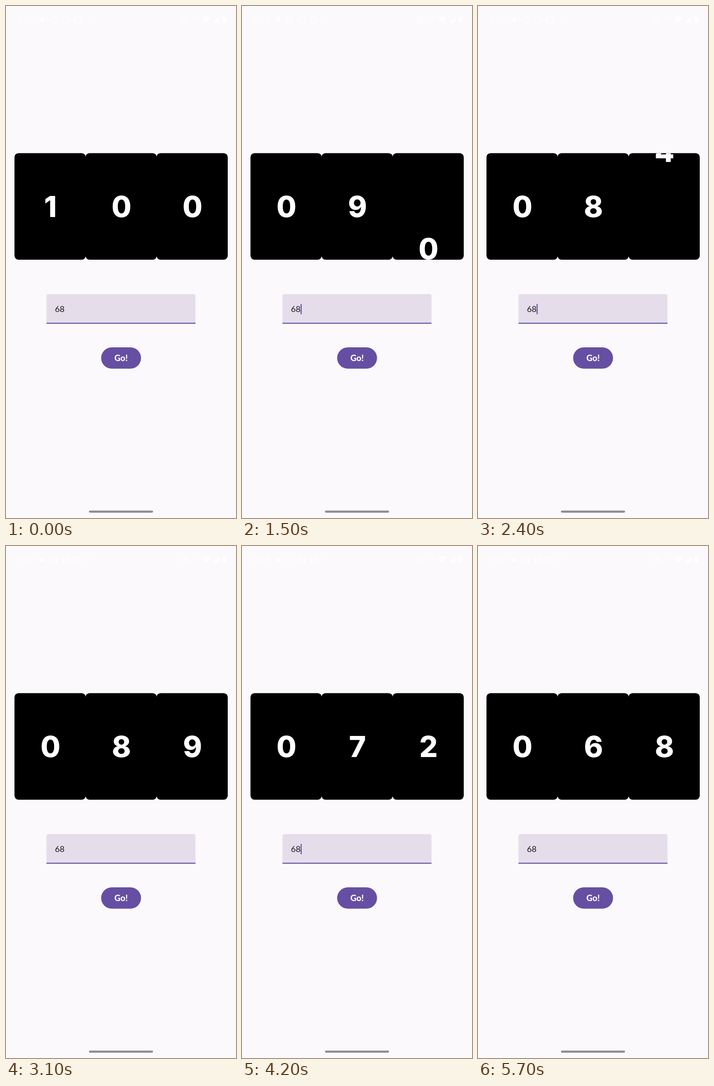
Recreate the animation shown at these times as an HTML page. Size 502 by 1116 pixels, loop 6.2 s.

```html
<!DOCTYPE html>
<html lang="en">
<head>
<meta charset="utf-8">
<title>Countdown</title>
<style>
  html, body { margin: 0; width: 100%; height: 100%; overflow: hidden; background: #fbf9fb; }
  svg { display: block; width: 502px; height: 1116px; }
  text { font-family: Lato, "Open Sans", sans-serif; }
  .digit { font: 800 63px Inter, "Open Sans", sans-serif; fill: #fff; text-anchor: middle; }
  .value { font-size: 18.2px; fill: #1c1b1f; }
  .label { font-size: 18.5px; font-weight: 800; fill: #fff; text-anchor: middle; }
  .clock { font-size: 18px; fill: #fff; }
  .accent { fill: #664fa3; }
  .line { fill: none; stroke: #fff; stroke-width: 1.5; }
</style>
</head>
<body>
<svg viewBox="0 0 502 1116">
  <rect width="502" height="1116" fill="#fbf9fb"/>

  <g fill="#fff">
    <text class="clock" x="24" y="36">9:07</text>
    <rect x="75" y="25" width="8" height="8"/>
    <circle class="line" cx="104" cy="30" r="6.500"/>
    <rect class="line" x="125" y="24" width="12" height="12"/>
    <rect class="line" x="150" y="24" width="12" height="12"/>
    <circle cx="181" cy="29" r="2"/>
    <circle class="line" cx="389.500" cy="29.500" r="6"/>
    <path class="line" d="M389.500 26v4l3 2M410 26q6-5 11 0"/>
    <path d="M428 26q9-7 18 0l-9 11z"/>
    <path d="M466 22v14h-14z"/>
    <rect x="472" y="23" width="9" height="13" rx="2"/>
  </g>

  <g id="reels"></g>

  <path d="M88.300 692V632.600q0-4.600 4.600-4.600H409q4.600 0 4.600 4.600V692z" fill="#e5deea"/>
  <rect class="accent" x="88.300" y="690.400" width="325.300" height="2.200"/>
  <text class="value" x="106.700" y="667">68</text>
  <rect id="cursor" class="accent" x="127.900" y="649.500" width="2.300" height="22.300"/>

  <rect class="accent" x="207.700" y="744" width="87" height="46.500" rx="23.250"/>
  <rect id="press" x="207.700" y="744" width="87" height="46.500" rx="23.250" fill="#614a99"/>
  <text class="label" x="251.200" y="773.500">Go!</text>

  <rect x="181" y="1099.700" width="140" height="4.700" rx="2.350" fill="#908e92"/>
</svg>

<script>
  const LOOP = 6200, FRAME = 100, START = 370, FIRST = 100, LAST = 68;
  const CARD = { x: 18.5, y: 320.7, w: 155, h: 232.4, r: 9 };
  const BASELINE = 460;
  const SVG = "http://www.w3.org/2000/svg";
  const clamp = (v, lo = 0, hi = 1) => Math.min(hi, Math.max(lo, v));

  function add(parent, tag, attrs) {
    const el = document.createElementNS(SVG, tag);
    for (const key in attrs) el.setAttribute(key, attrs[key]);
    return parent.appendChild(el);
  }

  function makeReel(i) {
    const x = CARD.x + i * CARD.w;
    // A slight overlap keeps the seams between cards closed.
    const box = { x, y: CARD.y, width: CARD.w + 0.5, height: CARD.h, rx: CARD.r };
    const root = document.getElementById("reels");
    add(add(root, "clipPath", { id: "card" + i }), "rect", box);
    add(root, "rect", box);
    const group = add(root, "g", { "clip-path": `url(#card${i})` });
    return add(group, "text", { class: "digit", x: x + CARD.w / 2 + 1, y: BASELINE });
  }

  const reels = [0, 1, 2].map(makeReel);
  const cursor = document.getElementById("cursor");
  const press = document.getElementById("press");

  // Each step takes slightly longer than the one before.
  function stepsAt(t) {
    const a = 1.03, b = 106;
    const k = (Math.sqrt(b * b + 4 * a * Math.max(0, t - START)) - b) / (2 * a);
    return Math.min(k, FIRST - LAST);
  }

  // The digit rests, leaves at the top, then the next one rises from below.
  function slide(p) {
    if (p < 0.36) return 0;
    if (p < 0.64) return -CARD.h * (p - 0.36) / 0.28;
    return CARD.h * (1 - clamp((p - 0.64) / 0.267)) ** 2;
  }

  function drawReel(text, place, k) {
    const digit = n => Math.floor((FIRST - n) / 10 ** place) % 10;
    // Carries reach the higher places one step late.
    const step = Math.floor(k) - (place ? 1 : 0);
    const from = digit(Math.max(0, step)), to = digit(Math.max(0, step + 1));
    const p = k % 1;
    const moving = from !== to && k < FIRST - LAST;
    text.textContent = moving && p >= 0.64 ? to : from;
    text.setAttribute("y", BASELINE + (moving ? slide(p) : 0));
  }

  function draw(t) {
    const k = stepsAt(t);
    reels.forEach((text, i) => drawReel(text, 2 - i, k));
    cursor.style.opacity = t >= 200 && (t - 200) % 1000 < 500 ? 1 : 0;
    press.style.opacity = Math.min(clamp((t - 80) / 150), clamp((740 - t) / 140));
  }

  const begin = performance.now();
  function tick() {
    const t = (performance.now() - begin) % LOOP;
    // The screen refreshes ten times a second.
    draw(Math.floor(t / FRAME) * FRAME);
    requestAnimationFrame(tick);
  }
  tick();
</script>
</body>
</html>
```
